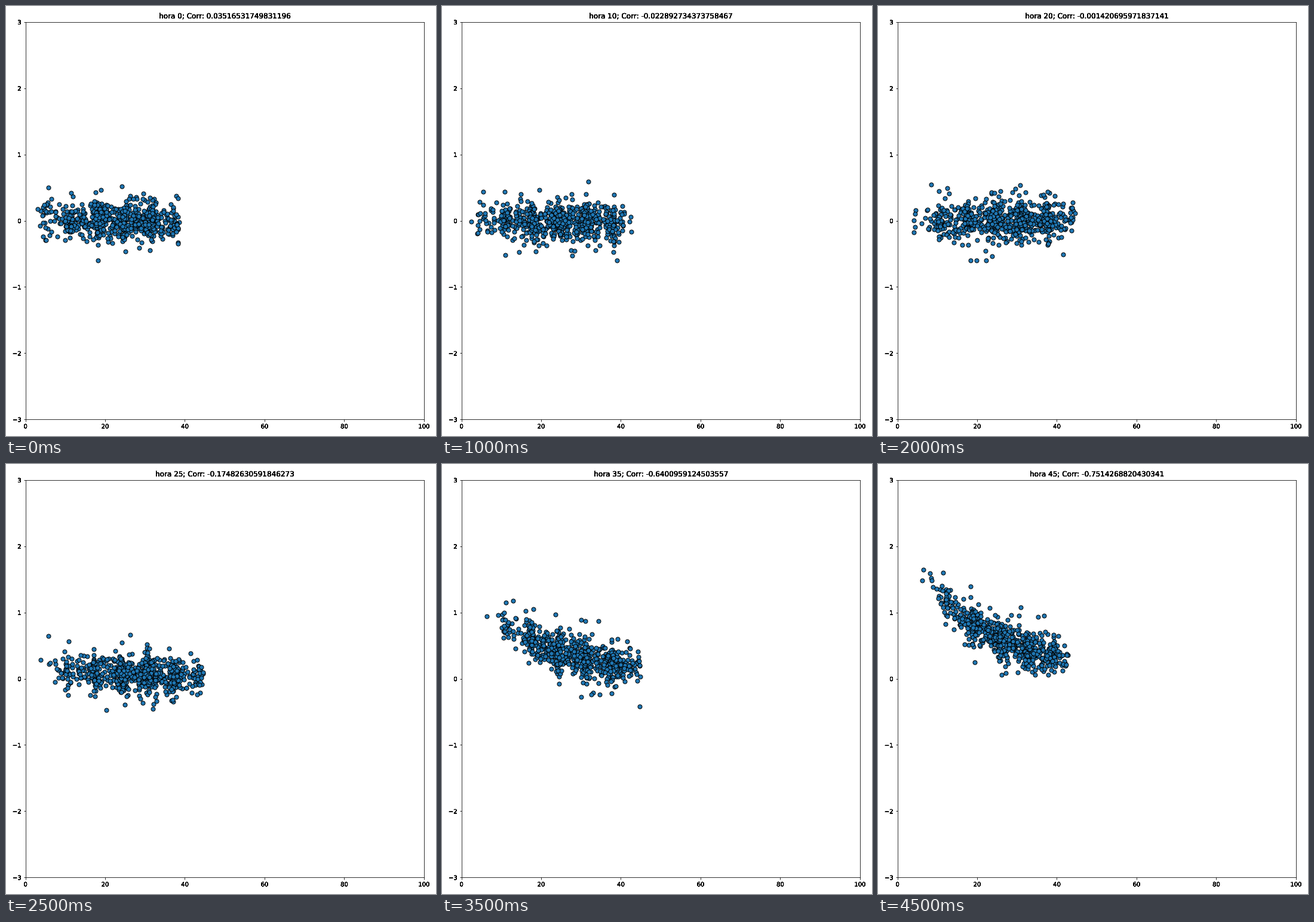
A matplotlib script that plays this animation: 720 px wide and 720 px high, repeating every 5 s.

```python
import numpy as np
import matplotlib.pyplot as plt
from matplotlib.animation import FuncAnimation
from matplotlib.patheffects import Normal

STAGE, DPI = 720, 72
STEP = 5
POINTS = 700
BAND = 6.8

CORR = [
    "0.03516531749831196", "-0.018364720518396472",
    "-0.022892734373758467", "-0.013657298140365728",
    "-0.001420695971837141", "-0.17482630591846273",
    "-0.43389848474854786", "-0.6400959124503557",
    "-0.699854354415514", "-0.7514268820430341",
]


def smooth(t):
    t = np.clip(t, 0, 1)
    return t * t * (3 - 2 * t)


def cloud(hour):
    rng = np.random.default_rng(100 + hour)
    lo = np.clip((hour - 15) / 3, 0, 5.4)
    hi = 40 + 6 * np.sin(np.pi * hour / 58)
    x = lo + (hi - lo) * rng.beta(2.6, 2.0, POINTS)

    # Pull the points into loose vertical bands
    phase = 18 + rng.uniform(-1, 1) * (hour > 0)
    x -= 0.75 * np.sin(2 * np.pi * (x - phase) / BAND)
    x = np.clip(x, lo, hi)

    # A decaying trend builds up from hour 20 on
    rise = smooth((hour - 20) / 25)
    trend = rise * (0.12 + 2.1 * np.exp(-x / 17.5))
    noise = np.clip(0.13 * rng.standard_t(7, POINTS), -0.6, 0.6)
    return np.column_stack([x, trend + noise])


fig, ax = plt.subplots(figsize=(STAGE / DPI, STAGE / DPI), dpi=DPI)
ax.set(xlim=(0, 100), ylim=(-3, 3))
dots = ax.scatter([], [], s=49, color="C0", edgecolors="black", linewidths=1)
title = ax.set_title(f"hora 0; Corr: {CORR[0]}")
fig.tight_layout()

# Repeated passes give the text its heavy, hard edges
for text in [title, *ax.get_xticklabels(), *ax.get_yticklabels()]:
    text.set_path_effects([Normal()] * 6)

clouds = [cloud(i * STEP) for i in range(len(CORR))]


def draw(i):
    dots.set_offsets(clouds[i])
    title.set_text(f"hora {i * STEP}; Corr: {CORR[i]}")
    return dots, title


anim = FuncAnimation(fig, draw, frames=len(CORR), init_func=lambda: draw(0),
                     interval=500, repeat=True, repeat_delay=0)
plt.show()
```
